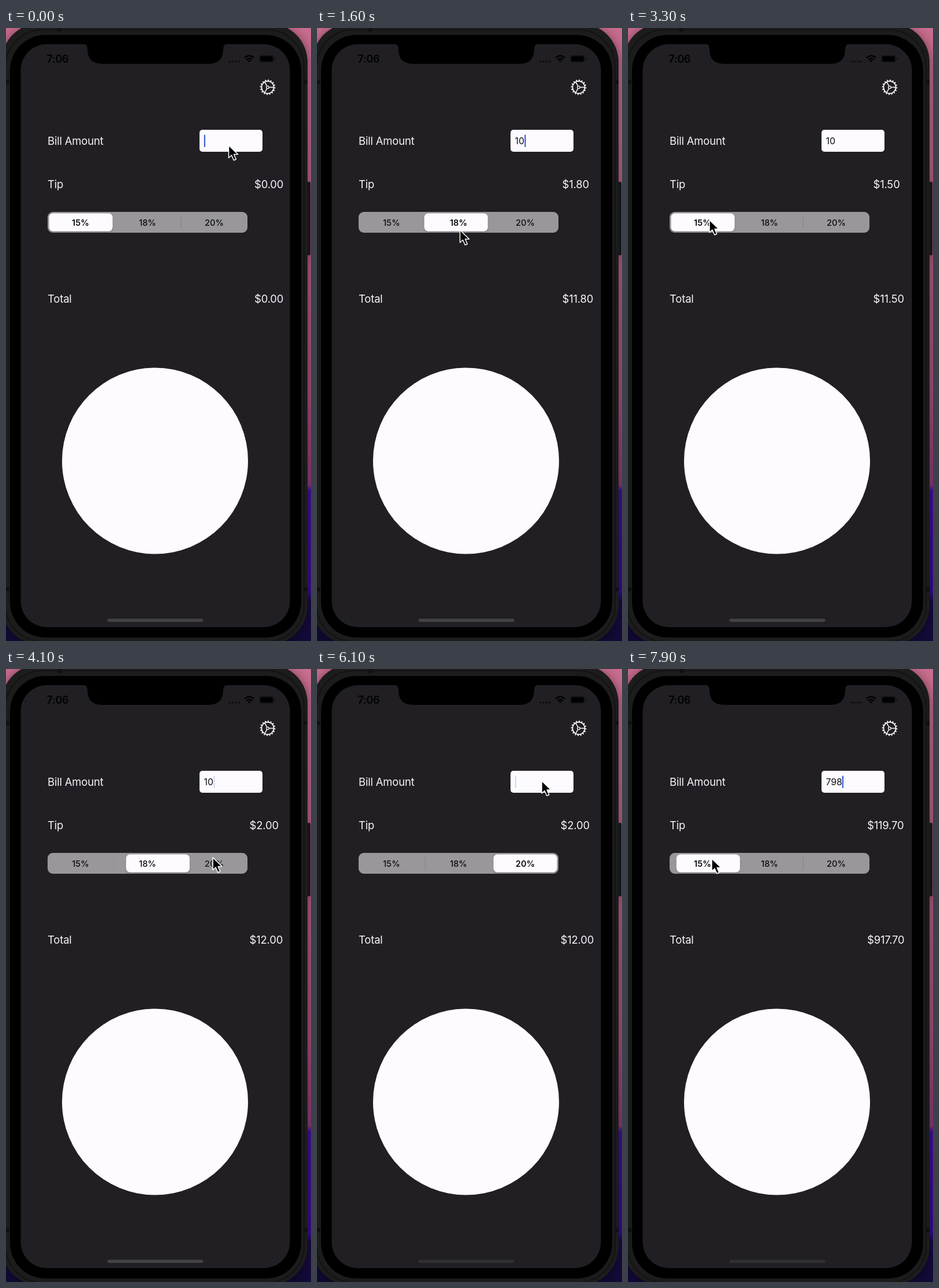
These frames come from a looping animation (528x1060 px, 8000 ms). An HTML page:

```html
<!DOCTYPE html>
<html lang="en">
<head>
<meta charset="utf-8">
<title>Tip calculator</title>
<style>
  html, body { margin: 0; width: 100%; height: 100%; overflow: hidden; background: #1a191b; }
  svg { display: block; width: 528px; height: 1060px; font-family: Inter, Roboto, sans-serif; }
  .label { font-size: 18.5px; letter-spacing: -.2px; fill: #f7f5fa; }
  .input { font-size: 15.8px; fill: #111; }
  .seg { font-size: 14.6px; text-anchor: middle; fill: #0b0b0c; }
  .clock { font-size: 18px; font-weight: 600; letter-spacing: -.3px; }
  .gear { fill: none; stroke: #fdfbff; }
</style>
</head>
<body>
<svg viewBox="0 0 528 1060">
  <defs>
    <linearGradient id="wall" x1="0" y1="0" x2="0" y2="1">
      <stop offset="0" stop-color="#c86d8e"/>
      <stop offset=".3" stop-color="#bb6085"/>
      <stop offset=".6" stop-color="#ac4f7c"/>
      <stop offset=".745" stop-color="#8d3a78"/>
      <stop offset=".755" stop-color="#40109a"/>
      <stop offset=".92" stop-color="#360d90"/>
      <stop offset=".935" stop-color="#190b45"/>
      <stop offset="1" stop-color="#120a38"/>
    </linearGradient>
    <filter id="soft" x="-10%" y="-30%" width="120%" height="170%">
      <feDropShadow dx="0" dy="1.5" stdDeviation="1.8" flood-opacity=".22"/>
    </filter>
    <filter id="shade" x="-10%" y="-5%" width="120%" height="110%">
      <feDropShadow dx="0" dy="4" stdDeviation="10" flood-opacity=".5"/>
    </filter>
    <clipPath id="lens"><rect x="-44" y="-24.5" width="88" height="49" rx="24"/></clipPath>
  </defs>

  <!-- wallpaper and phone body -->
  <rect width="528" height="1060" fill="url(#wall)"/>
  <g filter="url(#shade)">
    <rect x="518" y="266" width="9" height="127" rx="2" fill="#19181a"/>
    <rect x="-8" y="-8" width="530" height="1074" rx="67" fill="#1c1b1d"/>
  </g>
  <rect x="-1" y="3" width="517" height="1058" rx="64" fill="none" stroke="#131214" stroke-width="2"/>
  <g fill="#111012">
    <rect x="89" y="0" width="7" height="7"/>
    <rect x="0" y="90" width="6" height="7"/>
    <rect x="515" y="90" width="7" height="7"/>
    <rect x="0" y="967" width="6" height="7"/>
    <rect x="515" y="967" width="7" height="7"/>
  </g>
  <rect x="7" y="12" width="504" height="1042" rx="61" fill="#000"/>
  <rect x="25.5" y="28" width="466" height="1008" rx="45" fill="#211f24"/>
  <path d="M134 27.5Q141 28 141 36Q141 62 166 62H351Q376 62 376 36Q376 28 383 27.5Z" fill="#000"/>

  <!-- status bar -->
  <text class="clock" x="70.5" y="60">7:06</text>
  <g fill="#0d0c0e">
    <circle cx="387" cy="58" r="1.7"/><circle cx="392.4" cy="58" r="1.7"/>
    <circle cx="397.8" cy="58" r="1.7"/><circle cx="403.2" cy="58" r="1.7"/>
  </g>
  <g fill="none" stroke="#000" stroke-width="2.6">
    <path d="M413 51.5Q421 44.5 429 51.5M416 55Q421 50.5 426 55"/>
    <path d="M418.3 56.5Q421 54.5 423.7 56.5L421 59.5Z" fill="#000" stroke="none"/>
  </g>
  <rect x="438.5" y="47" width="25" height="12.5" rx="3.8" fill="#151417"/>
  <rect x="440.3" y="48.8" width="21.4" height="8.9" rx="2.2"/>
  <rect x="464.6" y="51" width="1.8" height="4.5" rx=".9" fill="#111"/>

  <!-- settings -->
  <g class="gear" transform="translate(453 102.5)">
    <circle r="10.6" stroke-width="1.7"/>
    <circle r="12.3" stroke-width="2" pathLength="64" stroke-dasharray="1.7 2.3"/>
    <circle r="2.2" stroke-width="1.3"/>
    <path d="M2.500 0H10M-1.250 2.200L-5 8.800M-1.250 -2.200L-5 -8.800" stroke-width="1.5"/>
  </g>

  <g class="label">
    <text x="72" y="202">Bill Amount</text>
    <text x="72" y="276.500">Tip</text>
    <text x="72" y="474.500">Total</text>
    <text id="tip" y="276.500"></text>
    <text id="total" y="474.500"></text>
  </g>

  <!-- bill field -->
  <rect x="335" y="176" width="109" height="38" rx="5" fill="#fdfbff"/>
  <text id="bill" class="input" x="342.500" y="201"></text>
  <rect id="caret" y="184.500" width="2.2" height="21.500" rx="1" fill="#3f5fd6"/>
  <g id="loupe">
    <g clip-path="url(#lens)">
      <rect x="-44" y="-25" width="88" height="50" fill="#211f24"/>
      <rect x="-54" y="-20.500" width="109" height="38" fill="#fdfbff"/>
      <text class="input" x="-45" y="4.500">10</text>
    </g>
  </g>

  <!-- tip selector -->
  <rect x="72" y="318" width="346" height="36" rx="9" fill="#99979b"/>
  <rect id="line0" x="186.800" y="325" width="1" height="22" fill="#858388"/>
  <rect id="line1" x="302.700" y="325" width="1" height="22" fill="#858388"/>
  <rect id="thumb" y="320.500" width="110" height="31" rx="7" fill="#fdfbff" filter="url(#soft)"/>
  <text class="seg" id="seg0" x="129" y="341.500">15%</text>
  <text class="seg" id="seg1" x="245" y="341.500">18%</text>
  <text class="seg" id="seg2" x="360.500" y="341.500">20%</text>

  <circle cx="258" cy="748.500" r="161" fill="#fdfbff"/>
  <rect id="home" x="175.500" y="1021.500" width="166" height="5.500" rx="2.700"/>

  <path id="pointer" d="M0 0V21.500L5 17L8.800 25.800L12.800 24L9 15.500H16Z" fill="#000"
        stroke="#fff" stroke-width="1.500" stroke-linejoin="round"/>
</svg>
<script>
  const LOOP = 8000, STEP = 100;
  const $ = id => document.getElementById(id);
  const set = (id, attrs) => {
    for (const k in attrs) $(id).setAttribute(k, attrs[k]);
  };
  const clamp = v => Math.min(1, Math.max(0, v));
  const ease = v => v * v * (3 - 2 * v);
  const mix = (a, b, p) => a + (b - a) * p;
  const latest = (list, t) => list.filter(e => e.at <= t).pop();

  // Field contents and the caret's place after each keystroke
  const typed = [
    { at: 0, text: '', x: 342.8 },
    { at: 400, text: '1', x: 350 },
    { at: 500, text: '10', x: 359.3 },
    { at: 5700, text: '1', x: 350 },
    { at: 5800, text: '', x: 342.8 },
    { at: 6200, text: '7', x: 352 },
    { at: 6300, text: '79', x: 361.5 },
    { at: 6500, text: '798', x: 370.8 }
  ];

  // Segment taps: the amounts change only here
  const taps = [
    { at: 0, start: -1000, from: 0, to: 0, tip: '$0.00', total: '$0.00', x: 430 },
    { at: 1300, start: 1345, from: 0, to: 1, tip: '$1.80', total: '$11.80', x: 424.5 },
    { at: 2750, start: 2793, from: 1, to: 0, tip: '$1.50', total: '$11.50', x: 424.5 },
    { at: 3980, start: 4003, from: 0, to: 2, tip: '$2.00', total: '$12.00', x: 421.5 },
    { at: 7600, start: 7650, from: 2, to: 0, tip: '$119.70', total: '$917.70', x: 414 }
  ];

  const moves = [
    { at: 800, end: 1300, x: 247.5, y: 349.5 },
    { at: 2200, end: 2700, x: 141, y: 332 },
    { at: 3400, end: 3950, x: 358, y: 326 },
    { at: 4350, end: 4780, x: 389, y: 193.5 },
    { at: 7000, end: 7560, x: 145, y: 328 }
  ];

  const blinks = [{ at: 850 }, { at: 4850, still: true }, { at: 5850 },
                  { at: 6200, still: true }, { at: 6900 }];

  function caretAlpha(t) {
    const b = latest(blinks, t);
    if (!b || b.still) return 1;
    const p = (t - b.at) % 1000 / 1000;
    return p < .45 ? 1 - clamp(p / .32) : clamp((p - .45) / .2);
  }

  function spring(ms) {
    const w = Math.max(0, ms) * .02;
    return 1 - (1 + w) * Math.exp(-w);
  }

  function drawField(t) {
    const now = latest(typed, t);
    $('bill').textContent = now.text;
    set('caret', { x: now.x, opacity: caretAlpha(t) });

    const q = t < 5150 ? clamp((t - 4950) / 200) : clamp((5390 - t) / 240);
    set('loupe', {
      transform: `translate(388 ${192 - 26 * q}) scale(${.95 + .2 * q})`,
      opacity: .6 * q
    });
  }

  function drawSelector(t) {
    const tap = latest(taps, t);
    const p = spring(t - tap.start);
    set('thumb', { x: 74.5 + 115.5 * mix(tap.from, tap.to, p) });
    const chosen = t < tap.start + 50 ? tap.from : tap.to;
    for (let i = 0; i < 3; i++) {
      const pressed = i === tap.to && tap.from !== tap.to;
      set('seg' + i, {
        'font-weight': i === chosen ? 600 : 500,
        opacity: pressed ? mix(.45, 1, clamp((t - tap.start) / 150)) : 1
      });
    }
    const shown = (line, s) => s === line || s === line + 1 ? 0 : 1;
    for (let i = 0; i < 2; i++)
      set('line' + i, { opacity: mix(shown(i, tap.from), shown(i, tap.to), p * p) });

    for (const id of ['tip', 'total']) {
      $(id).textContent = tap[id];
      set(id, { x: tap.x });
    }
  }

  function drawPointer(t) {
    let x = 385.5, y = 203;
    for (const m of moves) {
      const p = ease(clamp((t - m.at) / (m.end - m.at)));
      x = mix(x, m.x, p);
      y = mix(y, m.y, p);
    }
    set('pointer', { transform: `translate(${x} ${y})` });
  }

  function frame() {
    const t = Math.floor((performance.now() + 16) / STEP) * STEP % LOOP;
    drawField(t);
    drawSelector(t);
    drawPointer(t);
    set('home', { fill: t < 5000 ? '#434246' : '#302f33' });
    requestAnimationFrame(frame);
  }
  frame();
</script>
</body>
</html>
```
